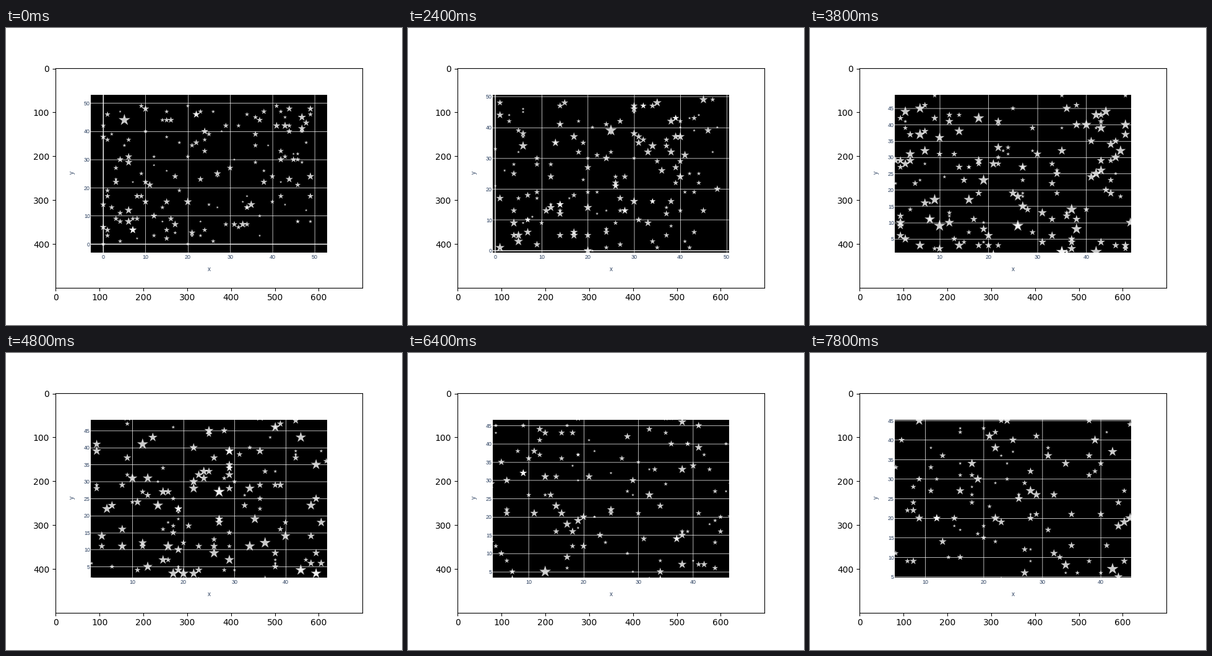
These frames come from a looping animation (640x480 px, 8 s). A matplotlib script:

```python
import numpy as np
import matplotlib.pyplot as plt
from matplotlib.animation import FuncAnimation
from matplotlib.collections import LineCollection
from matplotlib.patches import Rectangle

FRAMES, INTERVAL = 40, 200
LEFT, TOP, WIDE, HIGH = 79.5, 59.5, 540, 360   # black panel inside the picture
PX = 0.72                                      # points per pixel at 100 dpi
SCALE = 496 / 700                              # picture to stage
INK = "#2a3f5f"

# The oldest stars, which set the size of all others: x, y, born, died
GIANTS = [(5, 44, -20, 6), (25, 39, -4, 14), (26, 9, 9, 20),
          (27, 27, 13, 27), (13, 5, 16, 36), (42, 7, 26, 40)]


def make_stars(per_step=20, longest=10, seed=11):
    """Short-lived stars born at a steady rate on a 50 x 50 grid."""
    rng = np.random.default_rng(seed)
    born = np.repeat(np.arange(-longest, FRAMES), per_step)
    x, y = rng.integers(0, 50, (2, born.size))
    life = rng.integers(5, longest + 1, born.size)
    return np.vstack([GIANTS, np.column_stack([x, y, born, born + life])])


STARS = make_stars()

fig = plt.figure(figsize=(6.4, 4.8), dpi=100)
ax = fig.add_subplot()
ax.set(xlim=(-0.5, 699.5), ylim=(499.5, -0.5), aspect="equal")
panel = ax.add_patch(Rectangle((LEFT, TOP), WIDE, HIGH, fc="black", lw=0, zorder=1))


def rules(width):
    lines = LineCollection([], colors="white", linewidths=width * SCALE * PX, zorder=1.2)
    lines.set_snap(False)
    return ax.add_collection(lines, autolim=False)


grid, zero = rules(1), rules(2)
dots = ax.scatter([], [], marker="*", color="white", alpha=0.8, linewidths=0, zorder=2)
for art in (grid, zero, dots):
    art.set_clip_path(panel)


def label(x, y, text="", size=12.5, **kw):
    return ax.text(x, y, text, fontsize=size * SCALE * PX, color=INK,
                   family="Liberation Sans", va="center_baseline", **kw)


label(349.5, 457, "x", 14, ha="center")
label(38, 239.5, "y", 14, ha="center", rotation=90)
x_labels = [label(0, 429.5, ha="center") for _ in range(12)]
y_labels = [label(78.5, 0, ha="right") for _ in range(12)]


def ticks(lo, hi, step):
    return [v for v in range(0, 51, step) if lo - 1e-9 <= v <= hi + 1e-9]


def update(n):
    lo, hi = -3 + 0.2 * n, 53 - 0.2 * n
    span = hi - lo

    def right(v):
        return WIDE * (v - lo) / span

    def down(v):
        return HIGH * (hi - v) / span

    xs = ticks(lo, hi, 10)
    ys = ticks(lo, hi, 10 if span > 50 + 1e-9 else 5)

    # Rules sit on whole picture pixels; the double-width zero rule on an edge
    thin, thick = [], []
    for v in xs:
        x = LEFT + round(right(v)) + (0.5 if v else 0)
        (thin if v else thick).append([(x, TOP), (x, TOP + HIGH)])
    for v in ys:
        y = TOP + round(down(v)) + (0.5 if v else 0)
        (thin if v else thick).append([(LEFT, y), (LEFT + WIDE, y)])
    grid.set_segments(thin)
    zero.set_segments(thick)

    for text in x_labels + y_labels:
        text.set_text("")
    for text, v in zip(x_labels, xs):
        text.set(text=str(v), x=LEFT + right(v))
    for text, v in zip(y_labels, ys):
        text.set(text=str(v), y=TOP + down(v))

    # Area follows age, relative to the oldest living star
    x, y, born, died = STARS[(STARS[:, 2] < n) & (n <= STARS[:, 3])].T
    age = n - born
    radius = 14 * SCALE * PX * np.sqrt(age / age.max())
    dots.set_offsets(np.column_stack([LEFT + right(x), TOP + down(y)]))
    dots.set_sizes((2 * radius) ** 2)
    return [grid, zero, dots, *x_labels, *y_labels]


anim = FuncAnimation(fig, update, frames=FRAMES, interval=INTERVAL,
                     repeat=True, repeat_delay=0, blit=False)
plt.show()
```
